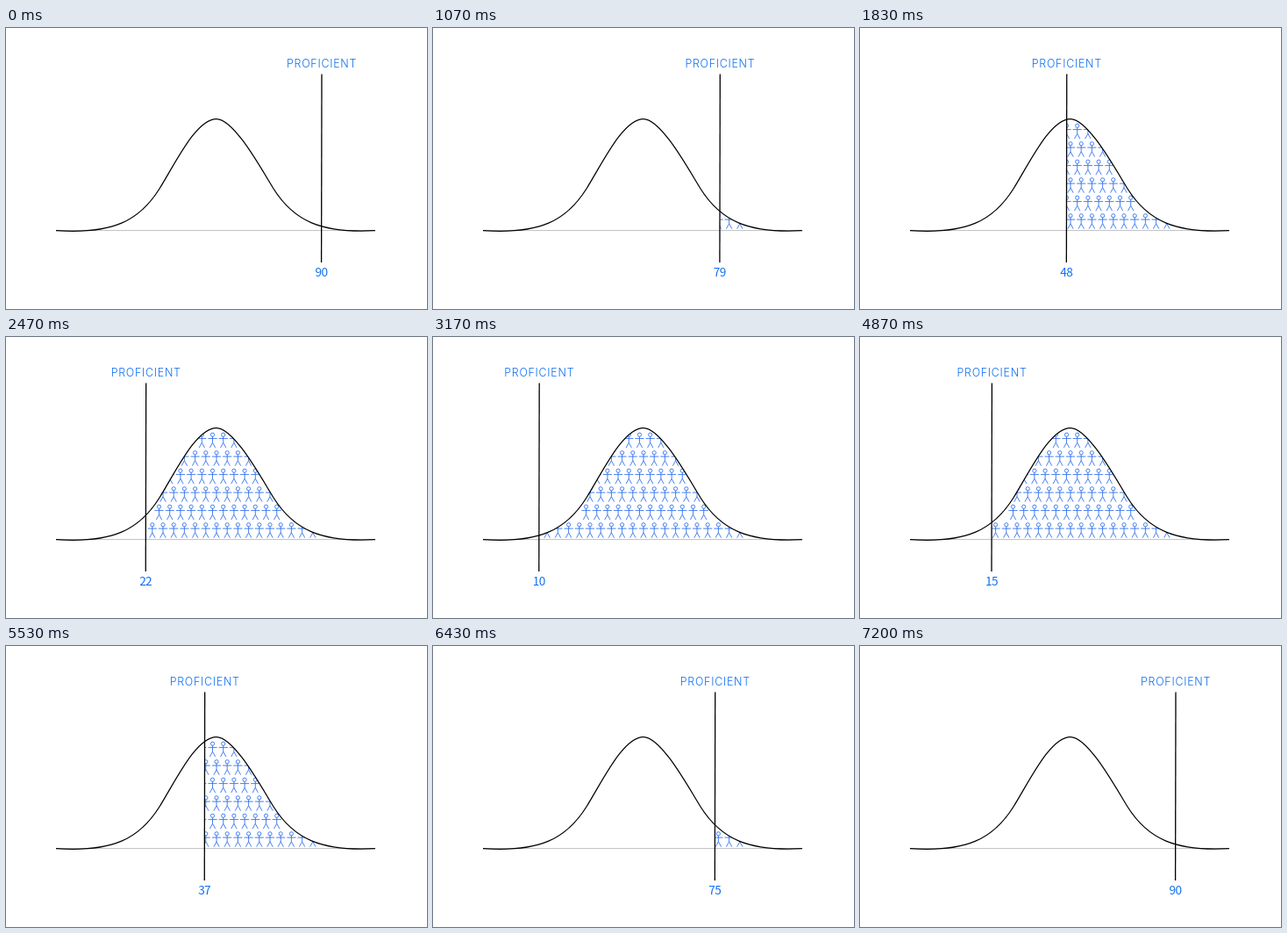
Write an HTML page with a canvas that moves like this. It is 480 px wide and 320 px high and loops after 8.96 s.

```html
<!DOCTYPE html>
<html lang="en">
<head>
<meta charset="utf-8">
<title>Proficiency curve</title>
<style>
  html, body { margin: 0; width: 100%; height: 100%; overflow: hidden; background: #fff; }
  canvas { display: block; }
</style>
</head>
<body>
<canvas id="stage" width="480" height="320"></canvas>
<script>
const ctx = document.getElementById('stage').getContext('2d');
const LOOP = 8960;
const BLUE = '#0f6ff0';
const FIGURE_BLUE = '#2569ee';
const HIGH = { x: 359.9, score: 90 };
const LOW = { x: 121.1, score: 10 };

const bell = new Path2D(`M57 230.6
  C122 235 152 219.6 175 183 C194 152.4 217 103.5 240 103.5
  C260 103.5 291 160.5 305 183 C328 219.6 359 234 421 230.6`);

// Rows of figures: first x, count
const rows = [[223.3, 4], [203.4, 7], [186.7, 9], [179, 11], [174.5, 12], [130.2, 19]];
const COLUMN = 12.2, ROW = 20.5, FIRST_ROW = 111.3;

const crowd = new Path2D();
rows.forEach(([first, count], row) => {
  for (let i = 0; i < count; i++) addFigure(first + i * COLUMN, FIRST_ROW + row * ROW);
});

function addFigure(x, y) {
  crowd.moveTo(x + 2.1, y);
  crowd.arc(x, y, 2.1, 0, Math.PI * 2);
  crowd.moveTo(x, y + 2.1);
  crowd.lineTo(x, y + 9);
  crowd.moveTo(x - 5.1, y + 4.3);
  crowd.lineTo(x + 5.1, y + 4.3);
  crowd.moveTo(x - 3.2, y + 14.9);
  crowd.lineTo(x, y + 9);
  crowd.lineTo(x + 3.2, y + 14.9);
}

const lerp = (a, b, p) => a + (b - a) * p;
const progress = (t, start, end) => Math.min(1, Math.max(0, (t - start) / (end - start)));

// cubic-bezier(x1, 0, x2, 1)
function ease(u, x1, x2) {
  if (u <= 0 || u >= 1) return u;
  let low = 0, high = 1, s;
  for (let i = 0; i < 30; i++) {
    s = (low + high) / 2;
    const x = 3 * x1 * s * (1 - s) ** 2 + 3 * x2 * s * s * (1 - s) + s ** 3;
    if (x < u) low = s; else high = s;
  }
  return s * s * (3 - 2 * s);
}

function pose(t) {
  const down = ease(progress(t, 433, 3160), 1 / 3, 2 / 3);
  const back = progress(t, 4443, 7195);
  const lineBack = ease(back, 0.172, 2 / 3);
  const scoreBack = ease(back, 1 / 3, 2 / 3);
  return {
    x: lerp(HIGH.x, LOW.x, down - lineBack),
    score: Math.floor(lerp(HIGH.score, LOW.score, down - scoreBack) + 1e-6)
  };
}

function strokeLine(x1, y1, x2, y2, color, width) {
  ctx.strokeStyle = color;
  ctx.lineWidth = width;
  ctx.beginPath();
  ctx.moveTo(x1, y1);
  ctx.lineTo(x2, y2);
  ctx.stroke();
}

function label(text, x, y, font, spacing) {
  ctx.font = font;
  ctx.letterSpacing = spacing + 'px';
  ctx.fillText(text, x + spacing / 2, y);
}

function draw(t) {
  const { x, score } = pose(t);
  ctx.fillStyle = '#fff';
  ctx.fillRect(0, 0, 480, 320);
  strokeLine(57, 230.6, 421, 230.6, '#b8b8b8', 0.9);

  ctx.save();
  ctx.beginPath();
  ctx.rect(x, 0, 480, 320);
  ctx.clip();
  ctx.clip(bell);
  ctx.strokeStyle = FIGURE_BLUE;
  ctx.lineWidth = 0.85;
  ctx.stroke(crowd);
  ctx.restore();

  ctx.strokeStyle = '#000';
  ctx.lineWidth = 1.25;
  ctx.stroke(bell);
  strokeLine(x + 0.1, 52.5, x - 0.3, 267, '#000', 1.3);

  ctx.fillStyle = BLUE;
  ctx.textAlign = 'center';
  label('PROFICIENT', x - 0.2, 45, '300 12.4px Inter, sans-serif', 0.75);
  label(score, x - 0.1, 283, '13.7px "Noto Sans CJK JP", "Noto Sans CJK SC", "Noto Sans CJK", sans-serif', -0.7);
}

// The motion advances at 30 pictures per second
function tick() {
  const t = performance.now() % LOOP;
  draw(Math.floor((t + 4) * 0.03) / 0.03);
  requestAnimationFrame(tick);
}
tick();
</script>
</body>
</html>
```
